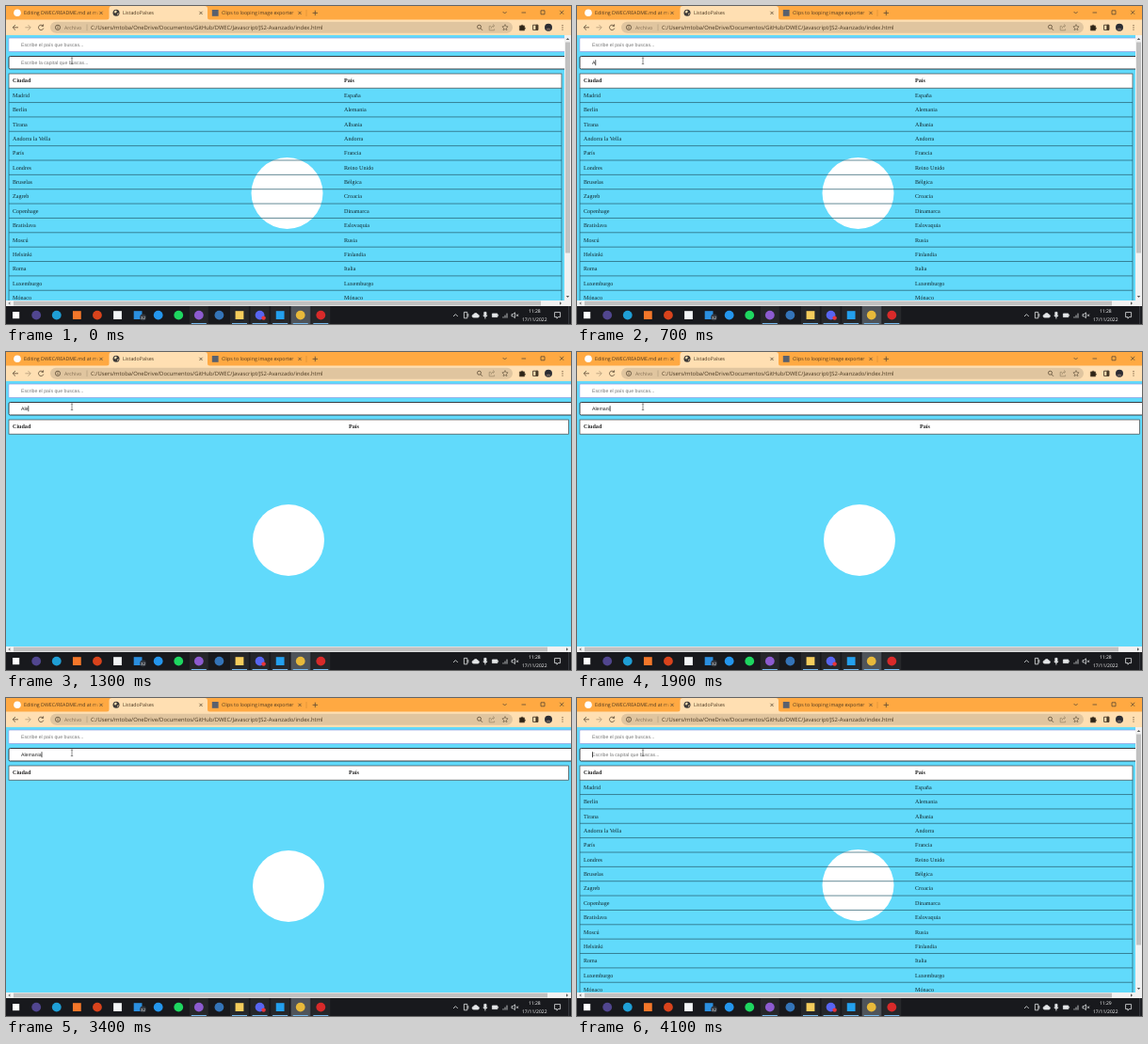
An HTML page that plays this animation: 600x338 px, repeating every 4200 ms.

```html
<!DOCTYPE html>
<html lang="es">
<head>
<meta charset="utf-8">
<title>ListadoPaíses</title>
<style>
  html, body { margin: 0; width: 100%; height: 100%; overflow: hidden; background: #61dafb; }
  svg { display: block; width: 600px; height: 338px; text-rendering: geometricPrecision; }
  .ui { font-family: "Open Sans", "Noto Sans", sans-serif; font-size: 5.25px; fill: #4a3820; }
  .url { font-size: 5.87px; }
  .field { font-family: "Liberation Sans", Arial, sans-serif; font-size: 5.2px; }
  .cell { font-family: "Liberation Serif", "Times New Roman", serif; font-size: 6.1px; fill: #12262c; }
  .head { font-weight: bold; fill: #222; }
  .rule { stroke: #245a6b; stroke-width: .7; fill: none; }
  .icon { fill: none; stroke: #5a4a34; stroke-width: .8; }
  .tray { fill: none; stroke: #e4e6e8; stroke-width: .8; }
  .clock { font-size: 5px; fill: #fff; text-anchor: middle; }
</style>
</head>
<body>
<svg viewBox="0 0 600 338">
  <defs>
    <linearGradient id="fade">
      <stop offset="0" stop-color="#ffa942" stop-opacity="0"/>
      <stop offset="1" stop-color="#ffa942"/>
    </linearGradient>
    <clipPath id="page"><rect y="31" width="600" height="282"/></clipPath>
    <clipPath id="tab"><rect width="98" height="14"/></clipPath>
  </defs>

  <!-- Page -->
  <rect y="31" width="600" height="282" fill="#61dafb"/>
  <g clip-path="url(#page)">
    <circle id="logo" r="38" fill="#fff"/>
    <rect x="2.8" y="34" width="620" height="14.5" rx="1" fill="#fff" stroke="#8b9be2" stroke-width=".7"/>
    <rect x="3" y="53.5" width="620" height="13.5" rx="1.4" fill="#fff" stroke="#26292e" stroke-width=".9"/>
    <text class="field" x="16" y="43.2" fill="#777">Escribe el país que buscas...</text>
    <text class="field" id="query" x="16" y="62.2"></text>
    <rect id="caret" y="57.2" width=".7" height="6" fill="#111"/>
    <g id="table"></g>
  </g>
  <path d="M68.8 55h2.4M70 55v6.6M68.8 61.6h2.4" fill="none" stroke="#444" stroke-width=".6"/>

  <!-- Scrollbars -->
  <g id="vbar">
    <rect x="593" y="31" width="7" height="282" fill="#f1f1f1"/>
    <rect x="594" y="38.5" width="5" height="224" fill="#c1c1c1"/>
    <path d="M594.8 36l1.7-2 1.7 2z" fill="#555"/>
    <path d="M594.8 308l1.7 2 1.7-2z" fill="#555"/>
  </g>
  <rect y="313" width="600" height="6.5" fill="#f1f1f1"/>
  <rect id="hthumb" x="8" y="313.6" height="4.8" fill="#c1c1c1"/>
  <path d="M4.4 314.3l-2 1.7 2 1.7z" fill="#777"/>
  <path id="harrow" d="M-1 314.3l2 1.7-2 1.7z" fill="#555"/>

  <!-- Browser frame -->
  <rect width="600" height="15" fill="#ffa942"/>
  <path d="M106.5 15q3 0 3-3V3q0-3 3-3h98.500q3 0 3 3v9q0 3 3 3z" fill="#ffdfb2"/>
  <rect y="14.5" width="600" height="16.5" fill="#ffdfb2"/>
  <rect x="47" y="16.8" width="491" height="12" rx="6" fill="#e0c59f"/>
  <circle cx="12" cy="7.3" r="3.8" fill="#fff"/>
  <text class="ui" x="19" y="9.2" clip-path="url(#tab)">Editing DWEC/README.md at main</text>
  <rect x="93" y="2" width="6" height="11" fill="url(#fade)"/>
  <circle cx="117" cy="7.3" r="3.5" fill="#3c3a38"/>
  <path d="M114.6 6l2-1.4 1.2 1-.8 1.6-1.4.4zM118 8l1.7-.6-.8 2.3z" fill="#ffdfb2"/>
  <text class="ui" x="124" y="9.2">ListadoPaíses</text>
  <rect x="218.8" y="4" width="6.8" height="6.8" fill="#59616e"/>
  <text class="ui" x="229" y="9.2">Clips to looping image exporter</text>
  <g class="icon" id="chrome">
    <path d="M319 4v7" stroke="#c98532" stroke-width=".5"/>
    <path d="M325.6 7.4h5.4M328.3 4.7v5.4"/>
    <path d="M527.6 6l2 2 2-2M547.5 7h4.6M568 4.8h4v4h-4zM588.2 4.8l4 4M592.2 4.8l-4 4"/>
    <path d="M13 22.8H7.4M10 20l-2.8 2.8L10 25.6"/>
    <path d="M20.4 22.8H26M23.4 20l2.8 2.8-2.8 2.8" stroke="#b29a78"/>
    <path d="M39.2 21a2.7 2.7 0 1 0 .6 2.6M39.6 19.4v2h-2"/>
    <circle cx="55" cy="22.8" r="2.6"/>
    <path d="M55 22.4v1.8M55 21v.7"/>
    <path d="M86 19.500v6.6" stroke="#a08d70" stroke-width=".5"/>
    <circle cx="502.5" cy="22.2" r="2"/>
    <path d="M504 23.8l2 2"/>
    <path d="M515 21.4h-1.8v4.4h5.4v-1.4M515 24q.2-3 3.4-3M517 19.4l1.7 1.6-1.7 1.6" stroke="#a08c6c"/>
    <path d="M530 19.6l.9 2 2.2.3-1.6 1.5.4 2.2-1.9-1.1-1.9 1.1.4-2.2-1.6-1.5 2.2-.3z" stroke-width=".6"/>
    <path d="M545.4 21h1.5a1.2 1.2 0 0 1 2.3 0h1.4v1.6a1.1 1.1 0 0 1 0 2.1v1.2h-5.2z" fill="#2e2417"/>
    <path d="M559.6 20.2h5.2v5.2h-5.2zM563 20.2v5.2" stroke="#2e2417"/>
    <path d="M563 20.2h1.8v5.2H563z" fill="#2e2417"/>
  </g>
  <circle cx="576" cy="22.8" r="4" fill="#2b2c33"/>
  <path d="M573.2 25.6a2.9 2.9 0 0 1 5.6 0z" fill="#75665f"/>
  <g fill="#4a3820">
    <circle cx="591" cy="20.6" r=".6"/><circle cx="591" cy="22.8" r=".6"/><circle cx="591" cy="25" r=".6"/>
  </g>
  <text class="ui" x="62" y="24.8" style="fill:#806c50">Archivo</text>
  <text class="ui url" x="90" y="24.8">C:/Users/mtoba/OneDrive/Documentos/GitHub/DWEC/Javascript/JS2-Avanzado/index.html</text>

  <!-- Taskbar -->
  <rect y="319" width="600" height="19" fill="#18191d"/>
  <rect x="302.5" y="319" width="21" height="19" fill="#444950"/>
  <path d="M597.7 319v19" stroke="#55585e" stroke-width=".6"/>
  <g id="apps"></g>
  <g class="tray">
    <path d="M475 330l2.4-2.4 2.4 2.4"/>
    <path d="M486.4 325.4h3.4v6.4h-3.4zM490.8 327v3.4"/>
    <path d="M496.600 331a1.500 1.500 0 0 1 0-3 2.300 2.300 0 0 1 4.300 0 1.500 1.500 0 0 1 0 3z" fill="#e4e6e8"/>
    <path d="M507.8 325.4h2.2v4h-2.2zM506.6 329q2.3 3 4.6 0M508.9 330.6v2" fill="#e4e6e8"/>
    <path d="M516.4 327h5.4v3.6h-5.4zM522.6 328v1.6" fill="#e4e6e8"/>
    <path d="M528 331.6v-1.4M530 331.6v-3M532 331.6v-5"/>
    <path d="M537 327.6h1.4l2-1.8v5.8l-2-1.8H537zM542 327.6l2 2.2M544 327.6l-2 2.2"/>
    <path d="M582.6 325.6h6v5h-2.4l-1.2 1.6v-1.6h-2.4z"/>
  </g>
  <text class="ui clock" id="clock" x="561.3" y="326.3"></text>
  <text class="ui clock" x="561.3" y="334.6">17/11/2022</text>
</svg>

<script>
const LOOP = 4200;
const PLACEHOLDER = 'Escribe la capital que buscas...';
const TYPED = [[0, ''], [700, 'A'], [1100, 'Al'], [1300, 'Ale'], [1400, 'Alem'], [1600, 'Alema'],
  [1700, 'Aleman'], [1900, 'Alemani'], [2000, 'Alemania'], [3800, '']];
const RESULTS = [[0, 'all'], [800, 'one'], [1200, 'none'], [3900, 'all']];
const CARET = [[0, false], [300, true], [2500, false], [3000, true], [3600, false], [4100, true]];
const CLOCK = [[0, '11:28'], [4100, '11:29']];

const CITIES = `Madrid,España;Berlín,Alemania;Tirana,Albania;Andorra la Vella,Andorra;París,Francia;
Londres,Reino Unido;Bruselas,Bélgica;Zagreb,Croacia;Copenhage,Dinamarca;Bratislava,Eslovaquia;
Moscú,Rusia;Helsinki,Finlandia;Roma,Italia;Luxemburgo,Luxemburgo;Mónaco,Mónaco`
  .split(';').map(row => row.trim().split(','));
const VIEWS = { all: CITIES, one: [CITIES[3]], none: [] };

const $ = id => document.getElementById(id);
const at = (track, t) => track.filter(step => step[0] <= t).pop()[1];
const set = (id, attrs) => Object.entries(attrs).forEach(([k, v]) => $(id).setAttribute(k, v));

function drawTable(view) {
  const full = view === 'all', rows = VIEWS[view];
  const right = full ? 590 : 597.5, country = full ? 359 : 364;
  const top = 72, head = 15.2, pitch = 15.36;
  const pair = ([a, b], y, cls) =>
    `<text class="${cls}" x="7" y="${y}">${a}</text><text class="${cls}" x="${country}" y="${y}">${b}</text>`;
  let out = `<rect class="rule" x="3" y="${top}" width="${right - 3}" height="${head}" style="fill:#fff;stroke:#444"/>`;
  out += pair(['Ciudad', 'País'], 81.2, 'cell head');
  rows.forEach((row, i) => {
    const y = top + head + i * pitch;
    out += `<path class="rule" d="M3 ${y}v${pitch}H${right}v${-pitch}"/>` + pair(row, y + 9.7, 'cell');
  });
  $('table').innerHTML = out;
  set('logo', full ? { cx: 298.5, cy: 199 } : { cx: 300, cy: 200 });
  set('vbar', { visibility: full ? 'visible' : 'hidden' });
  set('hthumb', { width: full ? 560 : 567 });
  set('harrow', { transform: `translate(${full ? 589 : 596} 0)` });
}

function drawField(text) {
  const query = $('query');
  query.textContent = text;
  const x = 16 + (text ? query.getComputedTextLength() : 0);
  query.textContent = text || PLACEHOLDER;
  set('query', { fill: text ? '#222' : '#777' });
  set('caret', { x });
}

function drawApps() {
  const colors = ['#fff', '#51468f', '#1f9fd6', '#f4772a', '#d9431c', '#f2f4f6', '#2b8fe0', '#2496ed',
    '#1ed760', '#8d5bd0', '#3474b8', '#f6cd5c', '#5865f2', '#23a0ee', '#e8b93a', '#d92a2a'];
  const squares = [0, 3, 5, 6, 11, 13], open = [9, 11, 12, 13, 14, 15];
  let out = '';
  colors.forEach((c, i) => {
    const x = 10.6 + i * 21.58, y = 328.6, r = i ? 4.4 : 3.6;
    if (open.includes(i)) {
      out += `<rect x="${x - 10}" y="319" width="20" height="19" fill="#fff" opacity=".06"/>` +
        `<rect x="${x - 8}" y="337" width="16" height="1" fill="#76b9ed"/>`;
    }
    out += squares.includes(i)
      ? `<rect x="${x - r}" y="${y - r}" width="${2 * r}" height="${2 * r}" fill="${c}"/>`
      : `<circle cx="${x}" cy="${y}" r="${r + .5}" fill="${c}"/>`;
  });
  out += '<circle cx="145.6" cy="331" r="3.4" fill="#30353c"/>' +
    '<text class="ui" x="145.6" y="332.7" style="font-size:4.4px;fill:#fff" text-anchor="middle">32</text>' +
    '<circle cx="273.6" cy="331.6" r="2.2" fill="#e8363c"/>';
  $('apps').innerHTML = out;
}

function drawTabButtons() {
  [101, 207, 312].forEach(x => {
    $('chrome').insertAdjacentHTML('beforeend', `<path d="M${x - 1.6} 5.8l3.2 3.2m0-3.2l-3.2 3.2"/>`);
  });
}

const shown = {};
function update(key, value, draw) {
  if (shown[key] === value) return;
  shown[key] = value;
  draw(value);
}

function frame() {
  const t = performance.now() % LOOP;
  update('view', at(RESULTS, t), drawTable);
  update('text', at(TYPED, t), drawField);
  update('caret', at(CARET, t), on => set('caret', { visibility: on ? 'visible' : 'hidden' }));
  update('clock', at(CLOCK, t), time => { $('clock').textContent = time; });
  requestAnimationFrame(frame);
}

drawApps();
drawTabButtons();
frame();
</script>
</body>
</html>
```
